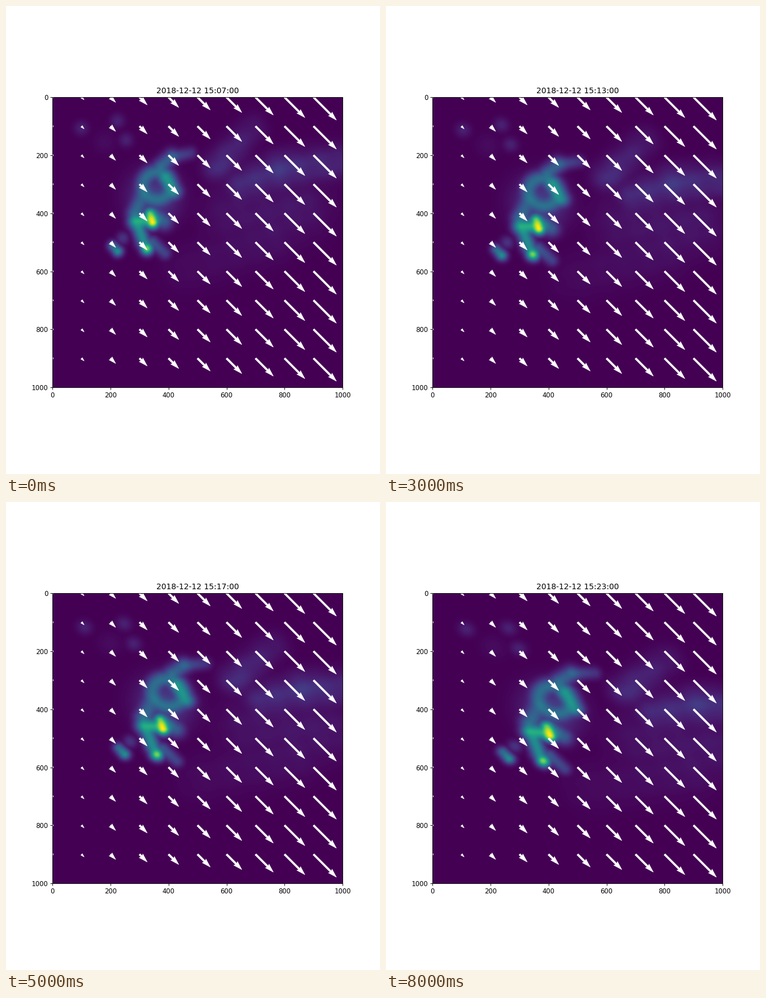
Animation of 669 by 837 pixels, one loop 9 s. Source, as a matplotlib script:

```python
import numpy as np
import matplotlib.pyplot as plt
from matplotlib.animation import FuncAnimation

W, H, DPI = 669, 837, 83.7
STEPS, INTERVAL = 9, 1000
GROWTH = 1.02          # flow speed is proportional to x
SIZE, CELLS = 1000, 500

plt.rcParams["font.family"] = "DejaVu Sans"


def blend(*layers):
    """Soft maximum of overlapping layers."""
    return np.cbrt(sum(layer ** 3 for layer in layers))


def spot(x, y, cx, cy, r, a):
    return a * np.exp(-((x - cx) ** 2 + (y - cy) ** 2) / (2 * r * r))


def streak(x, y, start, end, r, a, b):
    """Soft line whose strength runs from a to b."""
    dx, dy = np.subtract(end, start)
    t = ((x - start[0]) * dx + (y - start[1]) * dy) / (dx * dx + dy * dy)
    t = np.clip(t, 0, 1)
    d2 = (x - start[0] - t * dx) ** 2 + (y - start[1] - t * dy) ** 2
    return (a + (b - a) * t) * np.exp(-d2 / (2 * r * r))


def ring(x, y, cx, cy, radius, r, a):
    d = np.hypot(x - cx, y - cy) - radius
    return a * np.exp(-d * d / (2 * r * r))


def hook(x, y):
    """Upper loop of the storm with its tail."""
    return blend(
        ring(x, y, 360, 306, 47, 20, .36),
        streak(x, y, (390, 278), (418, 325), 20, .48, .46),
        streak(x, y, (375, 238), (411, 206), 19, .33, .28),
        streak(x, y, (411, 206), (476, 193), 15, .25, .15),
        streak(x, y, (312, 335), (286, 400), 21, .27, .36),
        spot(x, y, 350, 345, 58, .19),
    )


def core(x, y):
    """Bright centre and the cells hanging below it."""
    return blend(
        streak(x, y, (337, 403), (346, 432), 15, .75, .95),
        streak(x, y, (288, 428), (335, 425), 19, .62, .62),
        streak(x, y, (350, 415), (385, 428), 21, .5, .3),
        streak(x, y, (297, 450), (315, 500), 17, .48, .48),
        spot(x, y, 326, 522, 15, .8),
        streak(x, y, (345, 500), (388, 538), 15, .27, .2),
        streak(x, y, (208, 513), (225, 531), 13, .35, .48),
        spot(x, y, 243, 486, 15, .15),
    )


def plume(x, y):
    """Faint bands drifting out to the right."""
    ripple = 1 + .12 * np.sin(x / 19 + y / 31) * np.cos(y / 17 - x / 43)
    return ripple * blend(
        streak(x, y, (570, 240), (690, 110), 34, .13, .06),
        streak(x, y, (655, 300), (790, 250), 40, .12, .13),
        streak(x, y, (790, 250), (980, 225), 42, .13, .1),
        streak(x, y, (620, 400), (850, 380), 75, .05, .06),
        streak(x, y, (460, 590), (760, 480), 60, .025, .045),
    )


def rain(x, y):
    specks = [spot(x, y, cx, cy, 17, .09)
              for cx, cy in ((100, 107), (224, 82), (254, 148))]
    haze = spot(x, y, 180, 155, 28, .03)
    return blend(hook(x, y), core(x, y), plume(x, y), haze, *specks)


centres = (np.arange(CELLS) + .5) * SIZE / CELLS
gx, gy = np.meshgrid(centres, centres)


def advected(step):
    """Trace every point back along the flow to the first field."""
    x0 = gx / GROWTH ** step
    return rain(x0, gy - (gx - x0))


fig, ax = plt.subplots(figsize=((W + 1e-6) / DPI, (H + 1e-6) / DPI), dpi=DPI)
fig.subplots_adjust(left=.1245)
first = advected(0)
image = ax.imshow(first, cmap="viridis", vmin=0, vmax=first.max(),
                  extent=(0, SIZE, SIZE, 0))

qx, qy = np.meshgrid(np.arange(0, SIZE, 100), np.arange(0, SIZE, 100))
ax.quiver(qx, qy, qx, -qx, color="white", edgecolor="white", linewidth=.6)
ax.set_xlim(0, SIZE)
ax.set_ylim(SIZE, 0)
title = ax.set_title("")


def update(step):
    image.set_data(advected(step))
    title.set_text(f"2018-12-12 15:{7 + 2 * step:02d}:00")
    return image, title


anim = FuncAnimation(fig, update, frames=STEPS, interval=INTERVAL,
                     repeat=True, blit=False)
plt.show()
```
